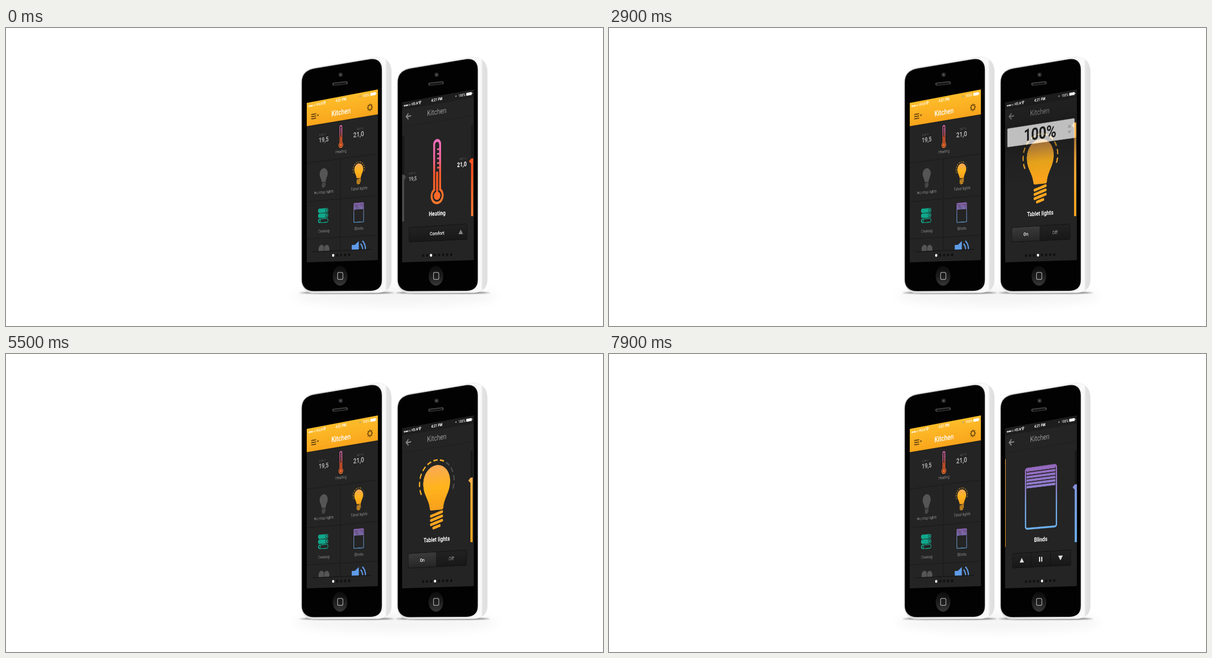
These frames come from a looping animation (1058x529 px, 8 s). An HTML page:

```html
<!DOCTYPE html>
<html lang="en">
<head>
<meta charset="utf-8">
<title>Home control</title>
<style>
  html, body { margin: 0; width: 100%; height: 100%; overflow: hidden; background: #fff; }
  svg { position: absolute; left: 0; top: 0; display: block; }
  .screen { transform-origin: 0 0; overflow: hidden; }
  text { font-family: Roboto, "Open Sans", sans-serif; }
</style>
</head>
<body>
<svg id="stage" width="1058" height="529" viewBox="0 0 1058 529"></svg>
<svg id="home" class="screen" viewBox="0 0 165 294"></svg>
<svg id="detail" class="screen" viewBox="0 0 165 294"></svg>
<script>
const W = 165, H = 294, RES = 1.5, LOOP = 8000;
const PITCH = W * 0.995, TOP = 61, BOTTOM = 218, DASHES = 11;
const $ = id => document.getElementById(id);
const range = (n, f) => Array.from({ length: n }, (_, i) => f(i)).join('');

// ---------- markup helpers ----------
const text = (x, y, str, size, fill, weight = 400, more = '') =>
  `<text x="${x}" y="${y}" font-size="${size}" fill="${fill}" font-weight="${weight}" text-anchor="middle" ${more}>${str}</text>`;
const rect = (x, y, w, h, fill, more = '') =>
  `<rect x="${x}" y="${y}" width="${w}" height="${h}" fill="${fill}" ${more}/>`;
const circle = (x, y, r, fill, more = '') =>
  `<circle cx="${x}" cy="${y}" r="${r}" fill="${fill}" ${more}/>`;
const path = (d, fill, more = '') => `<path d="${d}" fill="${fill}" ${more}/>`;
const line = (d, stroke, width, more = '') =>
  `<path d="${d}" fill="none" stroke="${stroke}" stroke-width="${width}" ${more}/>`;
const at = (x, y, s, body, more = '') =>
  `<g transform="translate(${x} ${y}) scale(${s})" ${more}>${body}</g>`;
const grad = (id, y1, y2, ...stops) =>
  `<linearGradient id="${id}" gradientUnits="userSpaceOnUse" x1="0" x2="0" y1="${y1}" y2="${y2}">` +
  stops.map(([o, c, a = 1]) => `<stop offset="${o}" stop-color="${c}" stop-opacity="${a}"/>`).join('') +
  '</linearGradient>';

// ---------- icons, centred on 0,0 ----------
const thermo = () =>
  `<g fill="url(#heat)"><rect x="-9" y="-58" width="18" height="108" rx="9"/><circle cy="43" r="15"/></g>` +
  rect(-4.6, -53, 9.2, 90, '#242424', 'rx="4.6"') + circle(0, 43, 10.5, '#242424') +
  rect(-2.3, 0, 4.6, 43, '#ff5a22', 'rx="1"') + circle(0, 43, 7.4, '#ff6a2a') +
  range(5, i => rect(0, -41 + 8.2 * i, 5, 2.8, 'url(#heat)'));

const bulb = fill =>
  path('M-31 0A31 31 0 0 1 31 0C31 20 18 27 15.5 46Q15 49 12 49H-12Q-15 49 -15.5 46C-18 27 -31 20 -31 0Z', fill) +
  range(4, i => {
    const y = 56 + 7.6 * i, w = i < 3 ? 12.5 : 7;
    return line(`M${-w} ${y + w / 4}L${w} ${y - w / 4}`, fill === 'url(#lamp)' ? '#fba61f' : fill, 5, 'stroke-linecap="round"');
  });

function rays(cls) {
  const p = deg => {
    const a = deg * Math.PI / 180;
    return (40 * Math.cos(a)).toFixed(2) + ' ' + (40 * Math.sin(a)).toFixed(2);
  };
  return range(DASHES, i => {
    const a = 152 + i * 21.6;
    return line(`M${p(a)}A40 40 0 0 1 ${p(a + 13.5)}`, '#fdb32a', 2.8, `class="${cls}"`);
  });
}

const blinds = () =>
  range(6, i => rect(-33, -53 + 6 * i, 66, 4.3, 'url(#shade)')) +
  rect(-35.5, -54, 71, 108, 'none', 'rx="4" stroke="url(#shade)" stroke-width="3.2"');

const tri = (x, y, w, h, fill) => path(`M${x - w} ${y + h}L${x} ${y - h}L${x + w} ${y + h}Z`, fill);

// ---------- shared screen parts ----------
const status = () =>
  range(5, i => circle(6 + 3.4 * i, 7, 1.25, i < 3 ? '#fff' : 'none', 'stroke="#fff" stroke-width=".5"')) +
  text(30.5, 8.6, 'VELN', 6.4, '#fff', 500) +
  line('M39.5 5.2Q43 2.4 46.5 5.2M41 7Q43 5.3 45 7', '#fff', 1.1) + circle(43, 8.4, 0.9, '#fff') +
  text(82.5, 8.6, '4:21 PM', 6.7, '#fff', 700) +
  circle(126, 6.3, 1.4, '#999') +
  text(139, 8.6, '100%', 6.4, '#fff', 500) +
  rect(148.5, 3.8, 12, 5, '#fff', 'rx="1"') + rect(161, 5.3, 1, 2, '#fff');

const pager = (x, n, cls) => range(n, i => circle(x + 9.27 * i, 283, 2.5, '#101010', `class="${cls}"`));

const slider = (fill, knob, v) =>
  rect(159.2, TOP, 4.8, BOTTOM - TOP, '#191919') +
  `<g class="level">${rect(159.2, v, 4.8, BOTTOM - v, fill)}</g>` +
  path('M154.6 0L159.2 -4.5H164V4.5H159.2Z', knob, `class="knob" transform="translate(0 ${v})"`);

const plate = () =>
  rect(16.5, 231, 134, 26.5, 'url(#plate)', 'rx="2" stroke="#111" stroke-width="1"');
const label = str => text(83.2, 213, str, 11, '#fff', 700);

// ---------- phones ----------
function phone(dx) {
  return `<g transform="translate(${dx} 0)">` +
    `<ellipse cx="604" cy="470" rx="84" ry="1.6" fill="#000" opacity=".6" filter="url(#soft)"/>` +
    path('M523.5 97C523.5 81 531 73 547 70L650 52C672 49 683 60 683 78V446C683 462 674 470 655 470L545 470.5C531 470.5 523.5 461 523.5 447Z',
      'url(#shell)', 'stroke="#e4e4e4" stroke-width=".6"') +
    path('M524.3 97C524.3 82 532 75 547 72L645 55.5C658 53.5 666 60 666 74V447C666 460 659 466 646 466.5L545 467C532 467 524.3 459 524.3 447Z',
      '#020202', 'stroke="#444" stroke-width=".6"') +
    circle(593, 83, 4, '#252525') + circle(593, 83, 1.7, '#56606a') +
    line('M581 99.7L603 97.2', '#454545', 5.6, 'stroke-linecap="round"') +
    line('M582 100L602 97.8', '#141414', 3, 'stroke-linecap="round"') +
    `<ellipse cx="592" cy="440" rx="13" ry="17.5" fill="url(#button)"/>` +
    rect(587.6, 433.8, 9.4, 12.6, 'none', 'rx="2.4" stroke="#a5a5a5" stroke-width="1.2"') + '</g>';
}

$('stage').innerHTML = '<defs>' +
  grad('heat', -58, 58, [0, '#f36fc0'], [0.3, '#f2649a'], [0.55, '#fb5a2a'], [1, '#ff7a2c']) +
  grad('lamp', -31, 48, [0, '#f8a957'], [0.5, '#ffb41c'], [1, '#f9a01c']) +
  grad('shade', -54, 54, [0, '#9468bd'], [0.35, '#8f80cf'], [0.6, '#78a4e4'], [1, '#6cb2f0']) +
  grad('plate', 231, 257, [0, '#222'], [1, '#181818']) +
  grad('key', 231, 257, [0, '#3b3b3b'], [1, '#262626']) +
  grad('bar', 0, 43, [0, '#fdbd2a'], [1, '#f9a51b']) +
  grad('barHot', 61, 218, [0, '#ff4a1a'], [0.5, '#ff4f1c'], [1, '#ff7d35']) +
  grad('barLamp', 61, 218, [0, '#fdb04a'], [1, '#fba51c']) +
  grad('barBlue', 61, 218, [0, '#8d86d6'], [0.5, '#7d9ee4'], [1, '#6cb2f0']) +
  grad('above', 0, 49.5, [0, '#141414', 0], [0.3, '#141414', 0.25], [1, '#141414', 0.5]) +
  grad('below', 83, 150, [0, '#141414', 0.5], [0.5, '#141414', 0.15], [1, '#141414', 0]) +
  grad('button', 422, 458, [0, '#0c0c0c'], [0.5, '#1c1c1c'], [1, '#383838']) +
  '<linearGradient id="shell" gradientUnits="userSpaceOnUse" x1="523" x2="683"><stop offset="0" stop-color="#ddd"/>' +
  '<stop offset=".5" stop-color="#f4f4f4"/><stop offset=".93" stop-color="#fafafa"/>' +
  '<stop offset=".95" stop-color="#e2e2e2"/><stop offset="1" stop-color="#dedede"/></linearGradient>' +
  '<filter id="soft" x="-20%" y="-300%" width="140%" height="700%"><feGaussianBlur stdDeviation="1.2"/></filter>' +
  '<filter id="haze" x="-20%" y="-100%" width="140%" height="300%"><feGaussianBlur stdDeviation="9"/></filter>' +
  '<clipPath id="fold"><rect width="165" height="274.5"/></clipPath></defs>' +
  '<ellipse cx="690" cy="476" rx="182" ry="18" fill="#000" opacity=".04" filter="url(#haze)"/>' +
  phone(0) + phone(170);

// ---------- left screen ----------
const GREY = '#8c8c8c', DIM = '#626262';
const caption = (x, y, str) => text(x, y, str, 7.4, GREY);
const gear = range(8, i => rect(-1.2, -6.4, 2.4, 3, '#7a5310', `transform="rotate(${45 * i})"`)) +
  circle(0, 0, 4, 'none', 'stroke="#7a5310" stroke-width="1.8"');
const log = (y, filled) => filled
  ? rect(28, y, 24, 8, '#10a88c', 'rx="3"') + circle(48, y + 4, 2.6, '#10a88c', 'stroke="#242424" stroke-width="1"')
  : rect(28.6, y + 0.6, 23, 7, 'none', 'rx="3" stroke="#10a88c" stroke-width="1.3"') + circle(32, y + 4, 2.2, 'none', 'stroke="#10a88c" stroke-width="1.2"');

$('home').innerHTML = rect(0, 0, W, H, '#242424') +
  line('M0 111H165M0 182.5H165M0 251H165M81 111V274', '#191919', 1) +
  text(38.5, 64.5, 'CUR °C', 5, DIM) + text(41.3, 77, '19,5', 12.2, '#c4c4c4', 500) +
  text(126, 64.5, 'SET °C', 5, DIM) + text(122.6, 77, '21,0', 12.6, '#c4c4c4', 500) +
  at(82, 71.5, 0.35, thermo()) + caption(82.5, 101, 'Heating') +
  at(41.3, 134, 0.31, bulb('#555')) + caption(41.5, 170, 'Worktop lights') +
  at(122.8, 133.5, 0.32, bulb('url(#lamp)') + rays('mini')) + caption(123.5, 170, 'Tabel lights') +
  log(197, true) + log(206, true) + log(215, false) + caption(41.5, 241, 'Cooking') +
  at(122.8, 209.6, 0.31, blinds()) + caption(123.2, 240, 'Blinds') +
  '<g clip-path="url(#fold)">' +
  `<ellipse cx="36" cy="271" rx="7" ry="8" fill="#555"/><ellipse cx="48.5" cy="271" rx="7" ry="8" fill="#555" stroke="#242424"/>` +
  path('M107 266H114L123 259.5V290H107Z', '#5f9be8') +
  line('M127 264.5Q131.5 268 131.5 276M131 259.5Q138 265 138 276', '#5f9be8', 2.6) + '</g>' +
  line('M15 275H150', '#151515', 1.2) +
  rect(0, 0, W, 43, 'url(#bar)') + rect(0, 43, W, 1.3, '#000', 'opacity=".25"') +
  status() +
  line('M11 23H23M11 27H23M11 31H23', '#6d4a10', 2) + path('M25 25H30L27.5 28.5Z', '#6d4a10') +
  text(82.3, 33, 'Kitchen', 13.2, '#fff', 500) + at(147.7, 28.6, 1, gear) +
  pager(64, 5, 'dotL');
document.querySelector('.dotL').setAttribute('fill', '#fff');

// ---------- right screen ----------
const heating =
  rect(0, 62, 5, 157, '#191919') + rect(0, 138, 5, 81, '#4c4c4c') + path('M0 133H5L9.4 138L5 143H0Z', '#4c4c4c') +
  at(83.2, 134.5, 1, thermo()) +
  text(24.5, 134, 'CUR °C', 5, DIM) + text(25.8, 146, '19,5', 10, '#ccc', 500) +
  text(141, 119, 'SET °C', 5, DIM) + text(139, 130.5, '21,0', 10.6, '#fff', 700) +
  slider('url(#barHot)', '#ff5522', 123) + label('Heating') + plate() +
  text(83, 247.5, 'Comfort', 9, '#fff', 500) + tri(136.5, 244, 5, 4, '#858585');

const lights =
  at(83.2, 107.5, 1, bulb('url(#lamp)') + rays('ray')) + slider('url(#barLamp)', '#fdb04a', TOP) +
  label('Tablet lights') + plate() + rect(17, 231.5, 65, 25.5, 'url(#key)', 'rx="2"') +
  text(50, 247.5, 'On', 9, '#fff', 500) + text(117, 247.5, 'Off', 9, '#a0a0a0');

const shades =
  at(83.4, 134, 1, blinds()) + slider('url(#barBlue)', '#8492dc', 123) + label('Blinds') + plate() +
  line('M61 231V257M106 231V257', '#0f0f0f', 1) +
  tri(39, 244, 5.2, 4.2, '#ddd') + rect(79.3, 240, 2.8, 8.5, '#ddd') + rect(84.4, 240, 2.8, 8.5, '#ddd') +
  tri(128, 244, 5.2, -4.2, '#ddd');

$('detail').innerHTML = rect(0, 0, W, H, '#242424') +
  '<g id="strip">' + [heating, lights, shades].map((p, i) => at(i * PITCH, 0, 1, p, `id="page${i}"`)).join('') + '</g>' +
  rect(0, 0, W, 14, '#1d1d1d') + status() + line('M0 45H165', '#1e1e1e', 1) +
  line('M22 27.5H10M15.5 22L10 27.5L15.5 33', '#858585', 2.3) +
  text(82.3, 33, 'Kitchen', 13.2, '#969696') + pager(50.6, 8, 'dotR') +
  '<g id="popup">' + rect(0, 0, W, 49.5, 'url(#above)') + rect(0, 83, W, 67, 'url(#below)') +
  rect(5.5, 49, 154.5, 34, '#fff', 'rx="1.5" opacity=".94"') +
  text(82.5, 76.5, '100%', 30.5, '#1c1c1c', 700, 'id="amount"') +
  tri(149, 61, 4.2, 2.8, '#c4c4c4') + tri(149, 72, 4.2, -2.8, '#c4c4c4') + '</g>';

// Perspective of an upright screen: left and right edges stay vertical.
function project(el, x0, x1, y0, y1, hL, hR) {
  const b = hL / hR, w = W * RES, h = H * RES;
  el.setAttribute('width', w);
  el.setAttribute('height', h);
  el.style.transform = `matrix3d(${[
    (x1 * b - x0) / w, (y1 * b - y0) / w, 0, (b - 1) / w,
    0, hL / h, 0, 0, 0, 0, 1, 0, x0, y0, 0, 1].join(',')})`;
}
project($('home'), 533, 659, 133, 109, 283, 303);
project($('detail'), 702, 829, 132, 109, 284, 303);

// ---------- motion ----------
const clamp = x => Math.max(0, Math.min(1, x));
const ease = x => x < 0.5 ? 4 * x ** 3 : 1 - 4 * (1 - x) ** 3;
const tween = (t, start, dur) => ease(clamp((t - start) / dur));
const rayEls = [...document.querySelectorAll('.ray')];
const miniEls = [...document.querySelectorAll('.mini')];
const dotEls = [...document.querySelectorAll('.dotR')];
const levelBar = $('page1').querySelector('.level rect');
const knob = $('page1').querySelector('.knob');
const paint = (els, value) => els.forEach((el, i) =>
  el.setAttribute('stroke', i < Math.round(DASHES * value) ? '#fdb32a' : '#4c4c4c'));

function draw(t) {
  const page = tween(t, 400, 1570) + tween(t, 5300, 1570) - tween(t, 7700, 1570);
  const reset = t >= 6500;
  const value = reset ? 1 : 1 - 0.32 * tween(t, 2900, 1500);
  const drop = (1 - value) * (BOTTOM - TOP);
  const show = clamp((t - 2800) / 133) * clamp((4400 - t) / 200);

  $('strip').setAttribute('transform', `translate(${-page * PITCH} 0)`);
  const active = 2 + Math.round(page);
  dotEls.forEach((d, i) => d.setAttribute('fill', i === active ? '#fff' : '#101010'));

  levelBar.setAttribute('y', TOP + drop);
  levelBar.setAttribute('height', BOTTOM - TOP - drop);
  knob.setAttribute('transform', `translate(0 ${TOP + drop})`);
  paint(rayEls, value);
  paint(miniEls, t >= 2900 && !reset ? 0.68 : 1);

  $('popup').setAttribute('opacity', show);
  $('popup').setAttribute('transform', `translate(0 ${drop})`);
  $('amount').textContent = Math.round(value * 100) + '%';
}

// The picture advances ten times a second.
const began = performance.now();
function tick() {
  const t = (performance.now() - began) % LOOP;
  draw(Math.floor(t / 100) * 100);
  requestAnimationFrame(tick);
}
tick();
</script>
</body>
</html>
```
